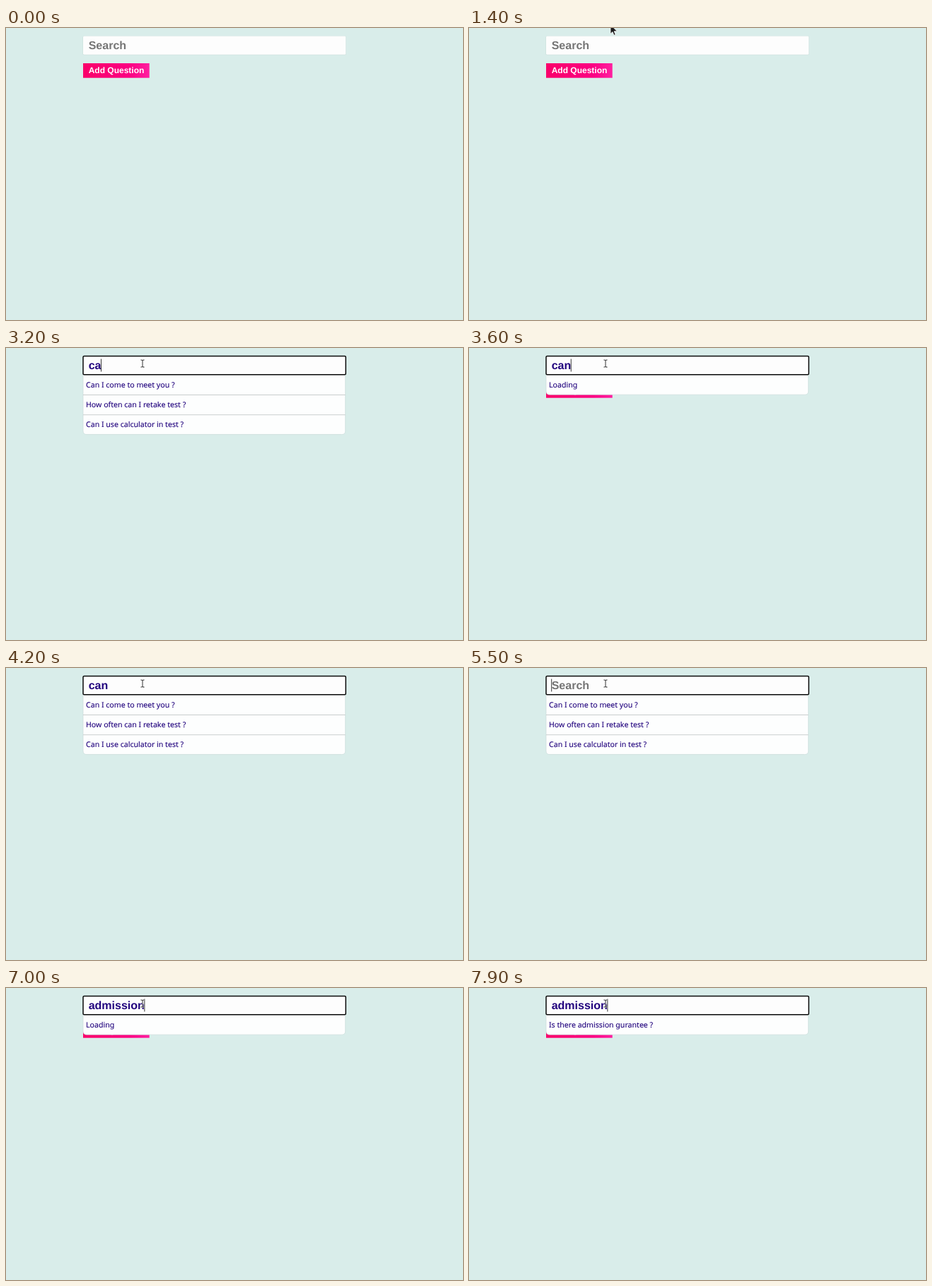
These frames come from a looping animation (646x414 px, 8 s). An HTML page:

```html
<!DOCTYPE html>
<html lang="en">
<head>
<meta charset="utf-8">
<title>Search suggestions</title>
<style>
  html, body { margin: 0; width: 100%; height: 100%; overflow: hidden; background: #d9edea; }
  svg { display: block; width: 646px; height: 414px; }
  text { text-rendering: geometricPrecision; white-space: pre; }
  .bold { font-family: "Liberation Sans", Arial, sans-serif; font-weight: 700; }
  .item { font-family: "Noto Sans", "Open Sans", sans-serif; font-size: 10.6px; fill: #23057f; stroke: #23057f; stroke-width: .12px; }
</style>
</head>
<body>
<svg viewBox="0 0 646 414">
  <defs>
    <linearGradient id="pink">
      <stop offset="0" stop-color="#fa006a"/>
      <stop offset=".7" stop-color="#fb0082"/>
      <stop offset="1" stop-color="#ff20a0"/>
    </linearGradient>
  </defs>
  <rect width="646" height="414" fill="#d9edea"/>

  <rect x="109" y="50" width="93.7" height="20.7" fill="url(#pink)"/>
  <text class="bold" x="116.7" y="64" font-size="12" fill="#fff">Add Question</text>

  <g id="list">
    <path id="panel" fill="#fdfefe" stroke="#cbdcda" stroke-width=".7"/>
    <g id="rows"></g>
  </g>

  <rect x="108.6" y="11.6" width="372" height="26.6" rx="1.5" fill="#c6d9d6"/>
  <rect id="field" x="109" y="11.5" width="371.3" height="26.2" rx="1.5" fill="#fdfdfd" stroke="#0b0b0b"/>
  <text id="value" class="bold" x="116.7" y="30" font-size="16"></text>
  <path id="caret" stroke="#222" stroke-width=".9"/>

  <path id="arrow" d="M0 0V13.2L3 10.4L5 15.2L7.2 14.3L5.2 9.6H9.4Z" fill="#1c1c1c" stroke="#fff" stroke-width=".8"/>
  <g id="beam" fill="none">
    <path id="halo" stroke="#fff" stroke-opacity=".6" stroke-width="2.4"/>
    <path id="bar" stroke="#555" stroke-width="1.2"/>
  </g>
</svg>
<script>
const LOOP = 8000, LEFT = 116.7, ROW = 28.2;
const FOCUS = 1900;
const $ = id => document.getElementById(id);

const questions = ["Can I come to meet you ?", "How often can I retake test ?", "Can I use calculator in test ?"];

// Each state holds from its time until the next one.
const typed = [
  [0, ""], [3100, "c"], [3200, "ca"], [3300, "can"],
  [4800, "ca"], [5100, "c"], [5500, ""],
  [5700, "a"], [5800, "ad"], [6100, "adm"], [6300, "admi"],
  [6400, "admis"], [6500, "admiss"], [6600, "admissio"], [6700, "admission"]
];
const results = [
  [0, []], [FOCUS, questions], [3600, ["Loading"]], [3900, questions],
  [7000, ["Loading"]], [7500, ["Is there admission gurantee ?"]]
];
const caretOff = [[0, FOCUS], [2500, 3100], [3900, 4600], [7300, 7900]];

// Pointer: time, x, y
const path = [
  [800, 68, 150], [1000, 108, 104], [1200, 178, 42],
  [1300, 208, 8], [1400, 200, -5], [1500, 196, 6], [1600, 194, 18], [1800, 193, 22]
];

const at = (track, t) => track.filter(s => s[0] <= t).pop()[1];

function pointer(t) {
  const last = path[path.length - 1];
  if (t >= last[0]) return [last[1], last[2]];
  const i = path.findIndex(p => p[0] > t);
  const [t0, x0, y0] = path[i - 1], [t1, x1, y1] = path[i];
  const k = (t - t0) / (t1 - t0);
  return [x0 + (x1 - x0) * k, y0 + (y1 - y0) * k];
}

const show = (el, on) => el.setAttribute("display", on ? "inline" : "none");

function drawPointer(t) {
  const visible = t >= 800;
  const [x, y] = visible ? pointer(t) : [0, 0];
  const inField = x > 109 && x < 480 && y > 11.5 && y < 38;
  show($("arrow"), visible && !inField);
  show($("beam"), visible && inField);
  $("arrow").setAttribute("transform", `translate(${x} ${y})`);
  $("beam").setAttribute("transform", `translate(${x} ${y})`);
}

let shown = null;
function drawList(items) {
  if (items === shown) return;
  shown = items;
  show($("list"), items.length > 0);
  const bottom = 38 + ROW * items.length;
  $("panel").setAttribute("d", `M109 37V${bottom - 5}q0 5 5 5H474.7q5 0 5-5V37Z`);
  $("rows").innerHTML = items.map((label, i) => {
    const top = 38 + ROW * i;
    const line = i ? `<path d="M109 ${top + .3}H479.7" stroke="#c9cdcd" stroke-width="1.1"/>` : "";
    return `${line}<text class="item" x="113" y="${top + 17.8}">${label}</text>`;
  }).join("");
}

function drawField(t) {
  const word = at(typed, t), value = $("value");
  value.textContent = word || "Search";
  value.setAttribute("fill", word ? "#23057f" : "#757575");
  $("field").setAttribute("stroke-width", t >= FOCUS ? 1.5 : 0);
  const x = LEFT + (word ? value.getComputedTextLength() : 0);
  $("caret").setAttribute("d", `M${x} 15.5V33.5`);
  show($("caret"), !caretOff.some(([a, b]) => t >= a && t < b));
}

function draw(t) {
  drawField(t);
  drawList(at(results, t));
  drawPointer(t);
}

for (const id of ["halo", "bar"]) {
  $(id).setAttribute("d", "M-2.5-5.2Q0-5.2 0-3.8Q0-5.2 2.5-5.2M0-4V4M-2.5 5.2Q0 5.2 0 3.8Q0 5.2 2.5 5.2");
}

const start = performance.now();
function tick() {
  draw((performance.now() - start) % LOOP);
  requestAnimationFrame(tick);
}
tick();
</script>
</body>
</html>
```
